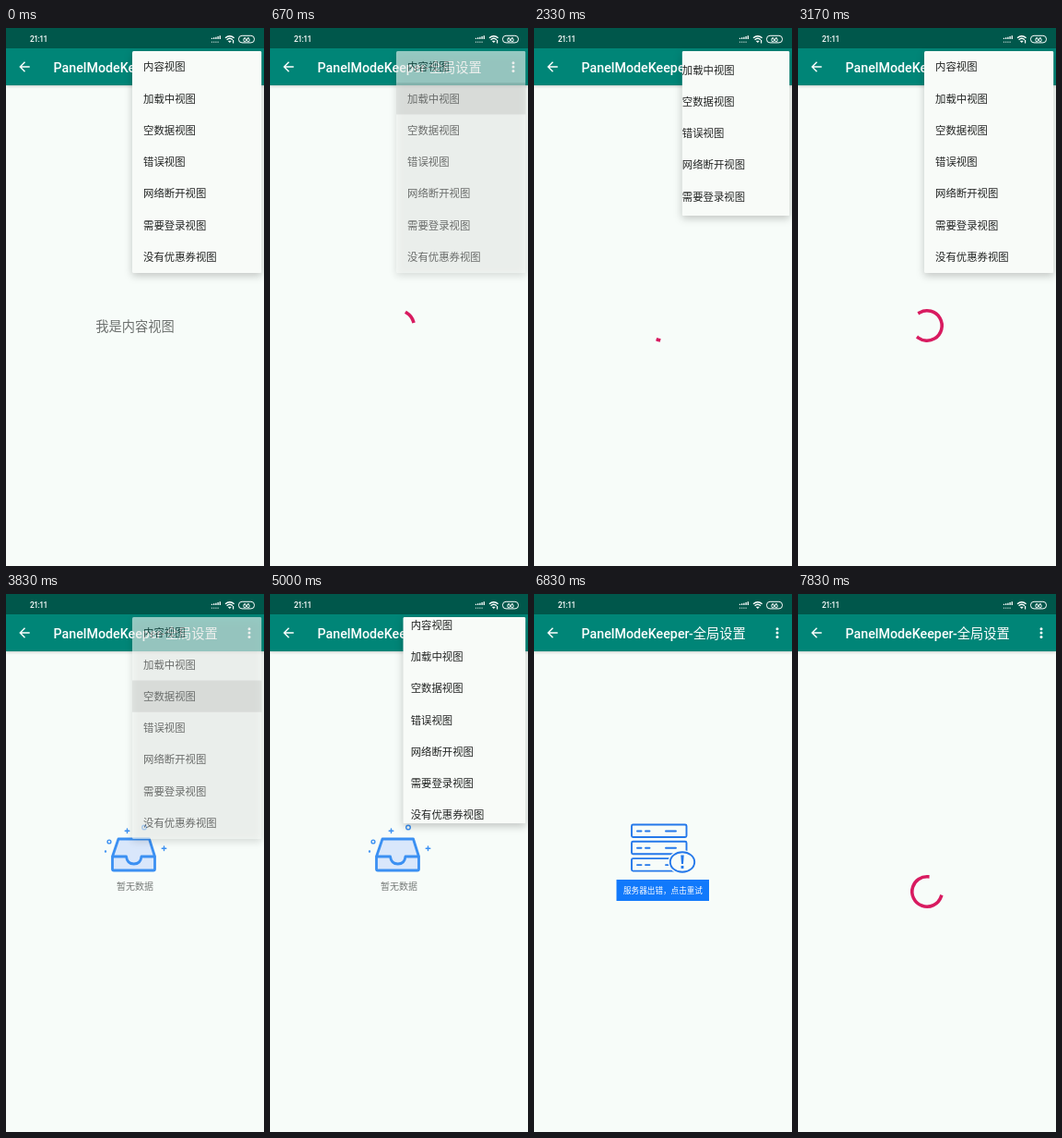
Animation of 280 by 582 pixels, one loop 8 s. Source, as an HTML page:

```html
<!DOCTYPE html>
<html lang="zh-CN">
<head>
<meta charset="utf-8">
<title>State views</title>
<style>
  html, body { margin: 0; width: 100%; height: 100%; overflow: hidden; background: #f7fcf9; }
  svg { display: block; }
  text { font-family: Roboto, "Noto Sans CJK SC", "Noto Sans CJK", sans-serif; }
  .bar { fill: #008577; filter: drop-shadow(0 1px 1.5px rgba(0, 0, 0, .2)); }
  .title { font-size: 14.25px; font-weight: 500; fill: #fff; }
  .status { font-size: 8.4px; font-weight: 500; letter-spacing: -.5px; fill: #fff; }
  .mid { text-anchor: middle; }
  .item { font-size: 11.4px; fill: #212322; }
  .line { fill: none; stroke: #3b90f2; stroke-linejoin: round; stroke-linecap: round; }
  .dark { stroke: #2478ea; }
  .white { fill: none; stroke: #fff; }
  #shade { fill: rgba(0, 0, 0, .22); filter: blur(4px); transform: translateY(3px); }
</style>
</head>
<body>
<svg width="280" height="582" viewBox="0 0 280 582">
  <rect width="280" height="582" fill="#f7fcf9"/>

  <g id="content">
    <text class="mid" x="140" y="327.9" font-size="14.25" fill="#6c706e">我是内容视图</text>
  </g>

  <g id="loading">
    <circle id="arc" cx="140" cy="322" r="16.2" pathLength="360" fill="none"
      stroke="#d81b60" stroke-width="3.6" stroke-linecap="square"/>
  </g>

  <g id="empty">
    <g class="line" stroke-width="2.8">
      <path d="M122 265H155.5L161.5 284V297.5Q161.5 299 160 299H117Q115.5 299 115.5 297.5V284Z" fill="#d9e7fb"/>
      <path d="M116 284H130.5Q131.500 292 138.800 292T147 284H161"/>
    </g>
    <g class="line" stroke-width="1.4">
      <path d="M131.5 254V258.6M129.2 256.3H133.8M171.5 273V277.6M169.2 275.3H173.8"/>
      <circle cx="150" cy="252.5" r="2.3"/>
      <circle cx="112" cy="268" r="1.9"/>
      <circle cx="108" cy="278.5" r=".5"/>
    </g>
    <text class="mid" x="140" y="319.8" font-size="10" fill="#777b79">暂无数据</text>
  </g>

  <g id="error">
    <g id="racks" class="line dark" stroke-width="1.9"></g>
    <ellipse cx="161" cy="290" rx="15.5" ry="13" fill="#f7fcf9"/>
    <ellipse class="line dark" cx="161" cy="290" rx="13.2" ry="10.8" stroke-width="1.9"/>
    <path d="M159.3 282.5H162.7L162 292H160ZM159.6 294H162.4V297H159.6Z" fill="#2478ea"/>
    <rect x="89.5" y="309" width="100.5" height="23" fill="#1179fb"/>
    <text class="mid" x="140" y="324" font-size="8.6" fill="#fff">服务器出错，点击重试</text>
  </g>

  <rect class="bar" y="22" width="280" height="40"/>
  <path transform="translate(11.45 33.45) scale(.7125)" fill="#fff"
    d="M20 11H7.83l5.59-5.59L12 4l-8 8 8 8 1.41-1.41L7.83 13H20z"/>
  <text class="title" x="51.5" y="48">PanelModeKeeper</text>
  <text class="title" x="168" y="48">-全局设置</text>
  <g fill="#fff">
    <circle cx="264" cy="37.8" r="1.5"/><circle cx="264" cy="42.1" r="1.5"/><circle cx="264" cy="46.4" r="1.5"/>
  </g>

  <rect width="280" height="22" fill="#00574b"/>
  <text class="status" x="26" y="15">21:11</text>
  <path class="white" stroke-width="1.3" d="M223.5 12V10.8M225.7 12V10.3M227.9 12V9.7M230.1 12V9M232.3 12V8.2"/>
  <path class="white" stroke-width="1.2" opacity=".6" d="M223.5 16V14.6M225.7 16V14.6M227.9 16V14.6M230.1 16V14.6"/>
  <g class="white" stroke-width="1.3">
    <path d="M238 10.8Q242.8 6.6 247.6 10.8M239.6 12.7Q242.8 9.9 246 12.7"/>
    <path d="M241.3 14.1H244.3L242.8 15.7Z" fill="#fff" stroke-width=".6"/>
    <path id="mark" d="M246.6 13V16.4" stroke-width="1.2"/>
  </g>
  <rect class="white" x="252.5" y="8.3" width="17" height="7.6" rx="3.6" stroke-width="1"/>
  <text class="status mid" x="260.800" y="14.800" style="font-size:7.4px">66</text>

  <rect id="shade" rx="1.5"/>
  <svg id="menu">
    <rect width="100%" height="100%" rx="1.5" fill="#f8fbf8"/>
    <g id="list">
      <clipPath id="row"><rect id="rowBox" width="141" height="34.25"/></clipPath>
      <circle id="ripple" cx="70.5" clip-path="url(#row)" fill="#000" fill-opacity=".125"/>
    </g>
  </svg>
</svg>

<script>
const $ = id => document.getElementById(id);
const LOOP = 8000, FPS = 6, ROW = 34.25, W = 140.5, H = 240, RIGHT = 277.5, TOP = 25;
const labels = ['内容视图', '加载中视图', '空数据视图', '错误视图', '网络断开视图', '需要登录视图', '没有优惠券视图'];

function add(parent, tag, attrs, text = '') {
  const el = document.createElementNS('http://www.w3.org/2000/svg', tag);
  set(el, attrs);
  el.textContent = text;
  parent.append(el);
}
function set(el, attrs) {
  for (const name in attrs) el.setAttribute(name, attrs[name]);
}

labels.forEach((label, i) => add($('list'), 'text', { class: 'item', x: 12, y: 21.4 + i * ROW }, label));
for (let i = 0; i < 3; i++) {
  const y = 249.5 + i * 18.3;
  add($('racks'), 'rect', { x: 106, y, width: 59.5, height: 13.5, rx: 1.5 });
  add($('racks'), 'path', { d: `M112 ${y + 7}h4.5M121 ${y + 7}h4.5M143 ${y + 7}h11` });
}

// Menu steps: opening size and alpha, then fading after a tap.
const openW = [.62, .832, .948, .988, 1];
const openH = [.42, .742, .93, .985, 1];
const fade = [.95, .6, .3, .08, 0];
const opens = [-9, 13, 28];
const taps = [{ at: 3, row: 1 }, { at: 22, row: 2 }, { at: 37, row: 3 }];

function menuAt(step) {
  const i = opens.findLastIndex(at => step >= at);
  const tap = taps[i], since = step - tap.at;
  const n = Math.min(step - opens[i], 4);
  return {
    w: W * openW[n], h: H * openH[n],
    alpha: since >= 0 ? fade[Math.min(since, 4)] : n ? 1 : .7,
    row: tap.row,
    ripple: since < 0 ? 0 : since ? 90 : 63.5
  };
}

function drawMenu(step) {
  const { w, h, alpha, row, ripple } = menuAt(step);
  const box = { x: RIGHT - w, y: TOP, width: w, height: h, opacity: alpha };
  set($('shade'), box);
  set($('menu'), box);
  set($('list'), { transform: `translate(${(w - W) / 2} ${(h - H) / 2})` });
  set($('rowBox'), { y: row * ROW });
  set($('ripple'), { cy: (row + .5) * ROW, r: ripple });
}

// Ease along the cubic (0,0) (.2,0) (.1,1) (.5,1), flat afterwards.
function trim(x) {
  if (x <= 0) return 0;
  if (x >= .5) return 1;
  let lo = 0, hi = 1;
  for (let i = 0; i < 20; i++) {
    const s = (lo + hi) / 2, r = 1 - s;
    if (.6 * s * r * r + .3 * s * s * r + .5 * s ** 3 < x) lo = s; else hi = s;
  }
  return lo * lo * (3 - 2 * lo);
}

function drawSpinner(n) {
  const turns = (n + .3) / 12.3, cycle = Math.floor(turns), p = turns - cycle;
  const tail = 270 * trim(p - .5), head = 270 * trim(p);
  const angle = 5.6 + 25.9 * n + 270 * cycle + tail - 90;
  set($('arc'), {
    'stroke-dasharray': `${Math.max(head - tail, .5)} 720`,
    transform: `rotate(${angle} 140 322)`
  });
}

function viewAt(step) {
  if (step < 3) return 'content';
  if (step < 22) return 'loading';
  if (step < 37) return 'empty';
  return step < 43 ? 'error' : 'loading';
}

function draw(now) {
  const t = now % LOOP;
  const step = Math.floor((t + 4) * FPS / 1000) % (LOOP * FPS / 1000);
  const view = viewAt(step);
  for (const id of ['content', 'loading', 'empty', 'error'])
    $(id).style.display = id === view ? '' : 'none';
  if (view === 'loading') drawSpinner(step - (step < 43 ? 3 : 43));
  $('mark').style.display = step >= 34 && step < 43 ? 'none' : '';
  drawMenu(step);
}

const start = performance.now();
function tick() {
  draw(performance.now() - start);
  requestAnimationFrame(tick);
}
tick();
</script>
</body>
</html>
```
